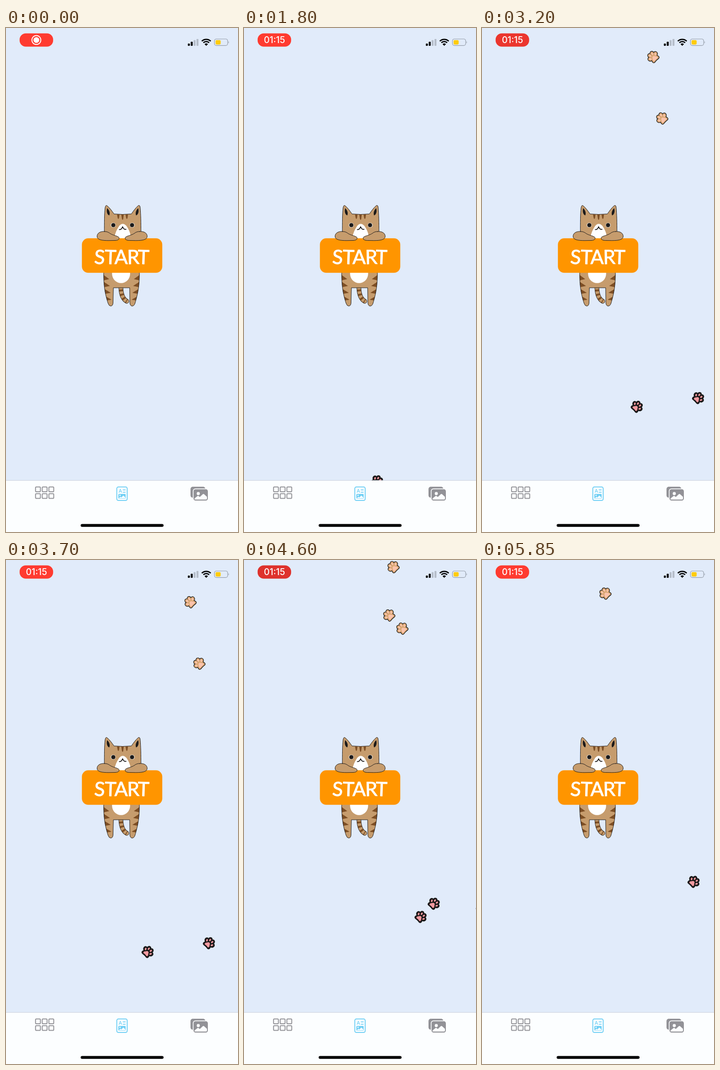
These frames come from a looping animation (508x1102 px, 5900 ms). An HTML page with a canvas:

```html
<!DOCTYPE html>
<html lang="en">
<head>
<meta charset="utf-8">
<title>Start screen</title>
<style>
html, body { margin: 0; width: 100%; height: 100%; overflow: hidden; background: #e1ebfa; }
canvas { display: block; width: 508px; height: 1102px; }
</style>
</head>
<body>
<canvas id="stage" role="img" aria-label="Cat holding a START button"></canvas>
<script>
const W = 508, H = 1102, LOOP = 5900;
const TAN = '#c69c6d', BROWN = '#7d4e24', INK = '#1c1a1a', GRAY = '#929297', BLUE = '#72d0f5', BAR = '#fcfeff';
const canvas = document.getElementById('stage');
const ctx = canvas.getContext('2d');
const dpr = window.devicePixelRatio || 1;
canvas.width = W * dpr;
canvas.height = H * dpr;
ctx.scale(dpr, dpr);

const clamp = v => Math.min(1, Math.max(0, v));

function paint(path, fill, stroke, width = 1) {
  if (fill) { ctx.fillStyle = fill; ctx.fill(path); }
  if (stroke) { ctx.strokeStyle = stroke; ctx.lineWidth = width; ctx.stroke(path); }
}
const shape = (d, fill, stroke, width) => paint(new Path2D(d), fill, stroke, width);

function box(x, y, w, h, r, fill, stroke, width) {
  const p = new Path2D();
  p.roundRect(x, y, w, h, r);
  paint(p, fill, stroke, width);
}

function oval(x, y, rx, ry, fill, turn = 0) {
  const p = new Path2D();
  p.ellipse(x, y, rx, ry, turn, 0, Math.PI * 2);
  paint(p, fill);
}

function text(str, x, y, font, fill) {
  ctx.font = font;
  ctx.textAlign = 'center';
  ctx.fillStyle = fill;
  ctx.fillText(str, x, y);
}

function mirrored(axis, draw) {
  draw();
  ctx.save();
  ctx.translate(axis * 2, 0);
  ctx.scale(-1, 1);
  draw();
  ctx.restore();
}

function recordPill(t) {
  const glow = clamp(0.5 + 0.6 * Math.cos((t - 1780) / 1960 * Math.PI * 2));
  const mix = (a, b) => Math.round(a + (b - a) * glow);
  box(29.8, 11.8, 73.4, 28.9, 13.5, `rgb(${mix(222, 255)},${mix(50, 59)},${mix(44, 48)})`);
  const clock = clamp((t - 1250) / 200);
  ctx.globalAlpha = 1 - clock;
  const ring = new Path2D();
  ring.arc(66.5, 26.3, 9.8, 0, Math.PI * 2);
  paint(ring, null, '#fff', 2);
  oval(66.5, 26.3, 6.3, 6.3, '#fff');
  ctx.globalAlpha = clock;
  text('01:15', 66.7, 33.2, '500 19.5px Inter, sans-serif', '#fff');
  ctx.globalAlpha = 1;
}

function statusIcons() {
  [5, 9, 12.5, 15].forEach((h, i) =>
    box(398.2 + i * 6.3, 39 - h, 4.3, h, 1.2, i < 2 ? '#000' : '#b5bdc9'));
  const a = Math.PI * 0.25;
  [13.8, 8.9].forEach(r => {
    const p = new Path2D();
    p.arc(438.5, 38.6, r, -Math.PI / 2 - a, -Math.PI / 2 + a);
    paint(p, null, '#000', 2.8);
  });
  shape('M438.5 39 L434.7 35.2 Q438.5 31.8 442.3 35.2 Z', '#000');
  box(456.4, 24, 29, 14.4, 4.4, null, '#949ca8', 1.2);
  box(458.8, 26.4, 11.2, 9.8, 2.4, '#ffcc0a');
  shape('M487 28.8 Q489.3 31.2 487 33.8 Z', '#949ca8');
}

function tabBar() {
  box(0, 989, W, H - 989, 0, BAR);
  box(0, 988.7, W, 1, 0, '#c8ced8');
  for (let i = 0; i < 6; i++)
    box(64.7 + i % 3 * 14.6, 1003.6 + (i > 2 ? 14.6 : 0), 10.6, 10.4, 1.8, null, GRAY, 2);

  box(242.6, 1003.6, 22.8, 29.4, 3.5, null, BLUE, 2);
  text('A', 250.4, 1016, '500 11px Inter, sans-serif', BLUE);
  box(255.5, 1009, 6.5, 1.7, 0.8, BLUE);
  box(255.5, 1014.2, 6.5, 1.7, 0.8, BLUE);
  box(246, 1018.8, 16, 10, 1.5, BLUE);
  oval(249.7, 1022, 1.4, 1.4, BAR);
  shape('M247 1028 L250.5 1025 L252.5 1026.5 L257 1022.2 L261 1026 V1028 Z', BAR);

  box(404, 1003, 32.5, 24, 5, GRAY);
  box(409, 1006.7, 34.5, 28, 6, BAR);
  box(410.6, 1008.4, 31.4, 24.8, 4.5, GRAY);
  oval(421, 1018, 3.4, 3.4, BAR);
  shape('M413 1031 V1028.4 L419.5 1023.3 Q420.6 1022.5 421.8 1023.5 L424.4 1025.6 L431 1019.2 Q432.3 1018.2 433.6 1019.2 L440 1025 V1029 Q440 1031 438 1031 Z', BAR);
  box(163.5, 1084.4, 181.5, 6.4, 3.2, '#000');
}

function catBody() {
  const body = new Path2D('M214 530 C213 565 218 585 223.5 602 Q225.5 608 229.5 608 Q234 607.5 234.4 601 L235.2 568 H270.8 L271.2 601 Q271.8 607.5 276 608 Q280.5 608 282.5 602 C287.5 585 293 565 292 530 Z');
  // tail: outlined thick stroke with dashed stripes
  const tail = new Path2D('M251.5 567 C252 582 256 593 264.5 597.5');
  ctx.lineCap = 'round';
  paint(tail, null, INK, 10);
  paint(tail, null, TAN, 8.2);
  ctx.lineCap = 'butt';
  ctx.setLineDash([4.2, 5.2]);
  ctx.lineDashOffset = -4.5;
  paint(tail, null, BROWN, 8.2);
  ctx.setLineDash([]);

  paint(body, TAN);
  ctx.save();
  ctx.clip(body);
  mirrored(253, () => {
    for (let i = 0; i < 4; i++) {
      const y = 538 + i * 15, x = 226 + i * 1.7;
      shape(`M208 ${y - 2} L${x} ${y + 11} L208 ${y + 15} Z`, BROWN);
    }
  });
  ctx.restore();
  oval(252, 537, 19.8, 20.8, '#fff');
  paint(body, null, INK);
}

function catHead() {
  shape('M215.3 462 V448 C215.4 425 215.2 408 217 393 Q218.2 386.4 221.2 388.4 C227 393 232 400 236.5 406.6 Q255 408.4 274.5 406.6 C279 400 284 393 289.5 388.4 Q293 386.4 293.8 392 C295.2 408 295.6 425 295.6 448 V462 Z', TAN, INK);
  mirrored(255.5, () => shape('M221.5 394 C219.4 401 221.4 408.5 226.2 409.8 C228.4 404 226 398 221.5 394 Z', INK));
  [[243, 417.5], [252.3, 419.5], [261.6, 417.5]].forEach(([x, y]) =>
    shape(`M${x} 407.4 H${x + 5.6} L${x + 4.4} ${y - 2} Q${x + 3} ${y + 2} ${x + 1.6} ${y - 2} Z`, BROWN));
  shape('M237 462 C238 449 243 440 248 432.5 Q255.5 424 263.5 432.5 C269 440 273 449 274 462 Z', '#fff');
  mirrored(255.5, () => {
    oval(234.8, 431, 5.5, 5.2, '#f4ede4');
    oval(235, 431, 4.6, 4.6, INK);
  });
  ctx.lineCap = ctx.lineJoin = 'round';
  shape('M248.2 440.6 Q252.5 441.6 255.3 434.6 Q258.3 441.4 262.8 440.2', null, INK, 1.9);
}

function button() {
  box(166.2, 459.8, 176, 75.5, 14, '#ff9500');
  const letters = [['S', 205, 0.06], ['T', 229, 0.03], ['A', 252, 0], ['R', 278.6, -0.02], ['T', 301.2, 0.03]];
  ctx.lineJoin = 'round';
  ctx.strokeStyle = '#fff';
  ctx.lineWidth = 1;
  for (const [ch, x, turn] of letters) {
    ctx.save();
    ctx.translate(x, 500.3);
    ctx.rotate(turn);
    text(ch, 0, 15.8, '400 43px Lato, "Open Sans", sans-serif', '#fff');
    ctx.strokeText(ch, 0, 15.8);
    ctx.restore();
  }
}

function catArms() {
  mirrored(254.3, () =>
    shape('M216 445 C206 444 199 449 199.4 456 C200 463.5 211 464.6 224 464.8 L239 464.5 C246.5 464.4 249.3 460.5 247 457.5 C243 454 234 453.5 227.5 449 C224 446 220 445 216 445 Z', TAN, INK));
}

const TOES = [[-8.4, -2, -0.5], [-3.5, -7.8, -0.15], [3.5, -7.8, 0.15], [8.4, -2, 0.5]];
const HEEL = new Path2D('M-5 -5 H5 L8 6.5 Q8.4 9 5.8 9 Q3 8.6 0 8.6 Q-3 8.6 -5.8 9 Q-8.4 9 -8 6.5 Z');

function paw(x, y, turn, edge, fur, pad) {
  const blob = (grow, color) => {
    TOES.forEach(([tx, ty, a]) => oval(tx, ty, 3.6 + grow, 4.2 + grow, color, a));
    paint(HEEL, color, color, 1 + grow * 2);
  };
  ctx.save();
  ctx.translate(x, y);
  ctx.rotate(turn);
  ctx.lineJoin = 'round';
  blob(1.4, edge);
  blob(0, fur);
  TOES.forEach(([tx, ty, a]) => oval(tx * 0.9, ty * 0.9, 1.8, 2.8, pad, a));
  shape('M0 -1.8 C3 -1.8 3.4 1.4 5.2 3.2 C7.4 6 5.4 8.6 2.8 7.6 Q0 6.8 -2.8 7.6 C-5.4 8.6 -7.4 6 -5.2 3.2 C-3.4 1.4 -3 -1.8 0 -1.8 Z', pad);
  ctx.restore();
}

// Two cats walk diagonally; front prints land ahead, hind prints follow half a beat later.
const BEAT = 1000, STRIDE = 76.6, REACH = 28.8, STAY = 750;
const WALKERS = [
  { dir: 1, feet: [[291, 991.3], [156.7, 1010.4]], look: [INK, INK, '#f49aa0'] },
  { dir: -1, feet: [[557.4, 245.6], [576.8, 380]], look: [INK, '#dba975', '#fac3ad'] }
];

function footprints(t) {
  for (const { dir, feet, look } of WALKERS)
    for (let k = 0; k < 6; k++)
      for (const [start, ahead] of [[890, REACH], [1390, 0]]) {
        const age = t - start - k * BEAT;
        if (age < 0 || age >= STAY) continue;
        const d = k * STRIDE + ahead;
        for (const [x, y] of feet) paw(x + dir * d, y - d, dir * Math.PI / 4, ...look);
      }
}

function draw(t) {
  ctx.lineCap = 'butt';
  ctx.lineJoin = 'miter';
  box(0, 0, W, H, 0, '#e1ebfa');
  footprints(t);
  ctx.lineJoin = 'miter';
  catBody();
  catHead();
  button();
  catArms();
  ctx.lineCap = 'butt';
  tabBar();
  statusIcons();
  recordPill(t);
}

const begin = performance.now();
function tick() {
  draw((performance.now() - begin) % LOOP);
  requestAnimationFrame(tick);
}
tick();
</script>
</body>
</html>
```
